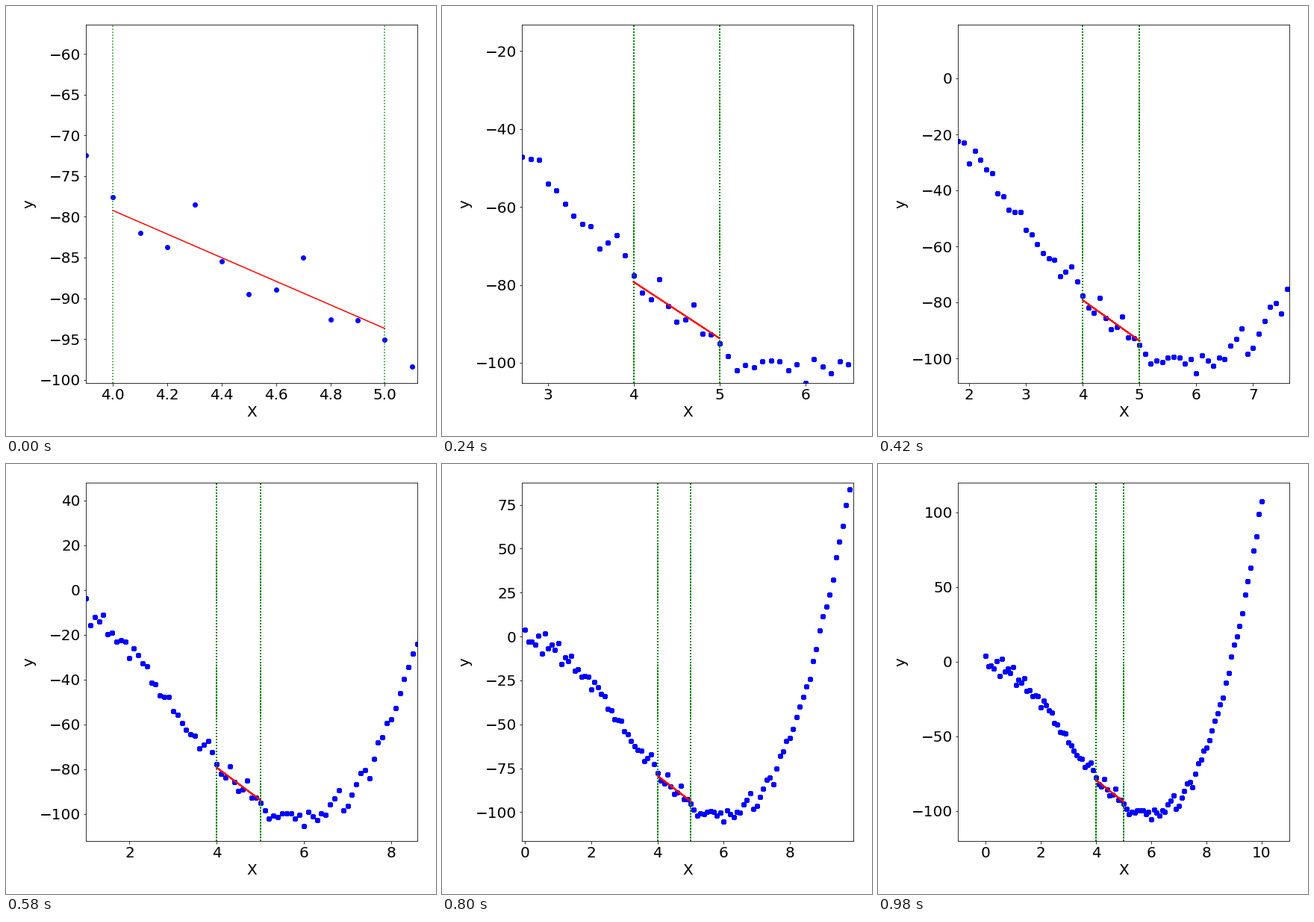
A matplotlib script for the animation above (1 s loop, 576 px wide and 576 px high).

```python
import numpy as np
import matplotlib.pyplot as plt
from matplotlib.animation import FuncAnimation

FRAMES = 50
SIZE = 576
LOW, HIGH = 4, 5

plt.rcParams.update({"font.family": "DejaVu Sans", "font.size": 20})

# Noisy cubic
np.random.seed(1)
x = np.linspace(0, 10, 101)
y = x**3 - 9 * x**2 + x - 1 + 3 * np.random.randn(x.size)


def ridge_line(xs, ys, alpha=0.1):
    """Return a function for the regularised straight-line fit."""
    dx = xs - xs.mean()
    slope = dx @ ys / (dx @ dx + alpha)
    return lambda t: ys.mean() + slope * (t - xs.mean())


inside = (x > LOW - 0.01) & (x < HIGH + 0.01)
fit = ridge_line(x[inside], y[inside])
ends = np.array([LOW, HIGH])

fig, ax = plt.subplots(figsize=(8, 8), dpi=SIZE / 8)
fig.subplots_adjust(left=107 / SIZE, right=551 / SIZE,
                    bottom=1 - 505 / SIZE, top=1 - 25 / SIZE)
ax.set_xlabel("X")
ax.set_ylabel("y")


def make_layer():
    return [
        ax.scatter(x, y, color="blue"),
        ax.axvline(LOW, color="green", linestyle=":"),
        ax.axvline(HIGH, color="green", linestyle=":"),
        ax.plot(ends, fit(ends), color="red")[0],
    ]


# One more layer shows on each step, so antialiased edges grow heavier.
layers = [make_layer() for _ in range(FRAMES)]


def update(frame):
    step = frame + 1
    ax.set_xlim(LOW - 0.1 * step, HIGH + 0.12 * step)
    ax.set_ylim(-100 - 0.4 * step, -60 + 3.6 * step)
    for i, layer in enumerate(layers):
        for artist in layer:
            artist.set_visible(i < step)


anim = FuncAnimation(fig, update, frames=FRAMES, interval=20,
                     repeat=True, repeat_delay=0)
plt.show()
```
